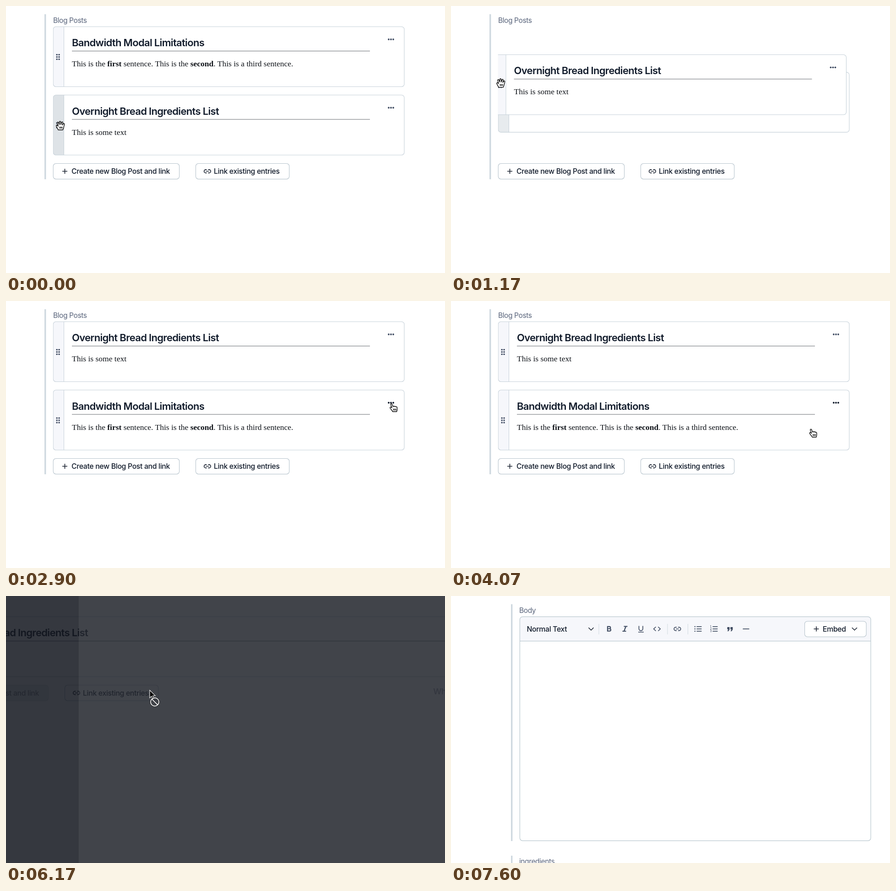
An HTML page for the animation above (9.36 s loop, 959 by 584 pixels).

```html
<!DOCTYPE html>
<html lang="en">
<head>
<meta charset="utf-8">
<title>Blog posts</title>
<style>
  html, body { margin: 0; width: 100%; height: 100%; overflow: hidden; background: #fff; }
  svg { display: block; width: 959px; height: 584px; }
  text { font: 500 15.8px Inter, sans-serif; letter-spacing: -.021em; fill: #111b2b; }
  .label { font-weight: 400; font-size: 15.6px; letter-spacing: -.028em; fill: #5a657c; }
  .title { font-weight: 600; font-size: 22px; letter-spacing: -.031em; }
  .body { font: 17.5px "Liberation Serif", serif; letter-spacing: 0; fill: #0c1016; }
  .entry { font-weight: 600; font-size: 17.9px; letter-spacing: -.023em; fill: #253049; text-anchor: middle; }
  .icon { fill: none; stroke: #414d63; stroke-width: 1.7; }
  .heavy { stroke-width: 2.2; }
  .ink { fill: none; stroke: #18202f; stroke-width: 1.6; }
  .cursor { fill: #fff; stroke: #000; stroke-width: 1.4; stroke-linejoin: round; }
</style>
</head>
<body>
<svg id="stage" viewBox="0 0 959 584"></svg>
<script>
const LOOP = 9360, ROW = 149.5;
const stage = document.getElementById('stage');

const smooth = p => p * p * (3 - 2 * p);
const linear = p => p;

// Value at time t along [time, value] keys.
function track(t, keys, ease = smooth) {
  if (t <= keys[0][0]) return keys[0][1];
  for (let i = 1; i < keys.length; i++) {
    const [t0, a] = keys[i - 1], [t1, b] = keys[i];
    if (t < t1) return a + (b - a) * ease((t - t0) / (t1 - t0));
  }
  return keys[keys.length - 1][1];
}

const group = (x, y, content, attrs = '') =>
  `<g transform="translate(${x} ${y})" ${attrs}>${content}</g>`;
const text = (x, y, content, cls = '') => `<text x="${x}" y="${y}" class="${cls}">${content}</text>`;
const path = (d, cls) => `<path d="${d}" class="${cls}"/>`;
const rect = (x, y, w, h, fill, attrs = '') =>
  `<rect x="${x}" y="${y}" width="${w}" height="${h}" fill="${fill}" ${attrs}/>`;
const dot = (x, y, r, fill) => `<circle cx="${x}" cy="${y}" r="${r}" fill="${fill}"/>`;
const bar = (x, y, h) => rect(x, y, 3.4, h, '#cfd9e0');
const plus = (x, y) => path(`M${x - 5.5} ${y}h11M${x} ${y - 5.5}v11`, 'ink');
const chevron = (x, y) => path(`M${x - 5.5} ${y - 2.8}l5.5 5.5l5.5-5.5`, 'ink');
const link = (x, y, cls) =>
  path(`M${x - 1.5} ${y - 3.6}h-2.2a3.6 3.6 0 0 0 0 7.2h2.2M${x + 1.5} ${y - 3.6}h2.2a3.6 3.6 0 0 1 0 7.2h-2.2M${x - 3} ${y}h6`, cls);
const button = (x, y, w, fill, content, attrs = '') =>
  `<g ${attrs}>${rect(x, y + 1, w, 34, '#e9edf0', 'rx="6"')}` +
  rect(x, y, w, 34, fill, 'rx="6" stroke="#b7c4cd" stroke-width="1.1"') + content + '</g>';

const overnight = ['Overnight Bread Ingredients List', 'This is some text'];
const bandwidth = ['Bandwidth Modal Limitations',
  'This is the <tspan font-weight="700">first</tspan> sentence. This is the ' +
  '<tspan font-weight="700">second</tspan>. This is a third sentence.'];

function card([title, body], x, y, { handle = '#f6f7fb', menu = '#414d63', extra = 0 } = {}) {
  let dots = '';
  for (const row of [-5, 0, 5]) dots += dot(111.2, 111.5 + row, 1.8, '#414d63') + dot(116, 111.5 + row, 1.8, '#414d63');
  for (const col of [836, 841, 846]) dots += dot(col + extra, 73, 1.9, menu);
  const w = 766.8 + extra;
  return group(x, y,
    rect(103.2, 45.2, w, 131.3, '#fff', 'rx="6"') +
    `<path d="M126.5 45.2H109.2a6 6 0 0 0-6 6V170.5a6 6 0 0 0 6 6H126.5Z" fill="${handle}"/>` +
    rect(126, 45.2, 1, 131.3, '#c6d1d9') +
    rect(103.2, 45.2, w, 131.3, 'none', 'rx="6" stroke="#c6d1d9" stroke-width="1.1"') +
    text(144, 88, title, 'title') + rect(144, 98, 651 + extra, 1, '#666a70') +
    text(144, 132, body, 'body') + dots);
}

function pointerAt(t) {
  const ease = t < 1670 ? linear : smooth;
  return {
    x: track(t, [[30, 119], [130, 118], [830, 118], [1170, 109], [1670, 110], [1900, 110], [2070, 113], [2230, 113],
      [2900, 847], [3170, 848], [3800, 800], [4000, 800], [4900, 318]], ease),
    y: track(t, [[30, 262], [130, 261], [830, 261], [1170, 169], [1500, 113], [1900, 113], [2070, 109], [2230, 109],
      [2900, 233], [3170, 234], [3800, 290], [4000, 290], [4900, 218]], ease)
  };
}

function postList(t, pointer) {
  const removed = t >= 4100, wide = t >= 5500;
  const buttonY = removed ? 195 : 344.5;
  const hover = removed && pointer.x < 379 && pointer.y < 229;
  const busy = t >= 5400;
  const extra = wide ? 600 : 0;
  const dragX = track(t, [[830, 0], [1170, -6.5], [1500, -6], [1670, 0]], linear);
  const dragY = track(t, [[830, ROW], [1170, 61.5], [1500, 2], [1670, 0]], linear);
  const swapY = track(t, [[1030, 0], [1260, ROW]]);
  const onHandle = t < 600 || (t > 1670 && pointer.x < 127);
  const swapHandle = t > 1030 && t < 1300 ? '#e7ebee' : '#f6f7fb';
  const menu = t > 2850 && t < 4100 ? '#111b2b' : '#414d63';

  let cards = '';
  if (!removed) cards += card(bandwidth, 0, swapY, { handle: swapHandle, menu });
  cards += card(overnight, dragX, dragY, { handle: onHandle ? '#dee3e7' : '#f6f7fb', extra });

  const slide = track(t, [[5550, 0], [6080, -286]]);
  return group(slide, 0,
    bar(84, 18, buttonY + 34.5 - 18) + text(103, 37, 'Blog Posts', 'label') +
    `<g clip-path="url(#list)">${cards}</g>` +
    button(103.2, buttonY, 275.4, hover ? '#e0e5e8' : '#fff',
      plus(128.5, buttonY + 17) + text(143, buttonY + 22.5, 'Create new Blog Post and link'),
      busy ? 'opacity=".5"' : '') +
    button(414.5, buttonY, 204.3, '#fff',
      link(440, buttonY + 17, 'ink') + text(454, buttonY + 22.5, 'Link existing entries')));
}

function loader(t) {
  const shown = track(t, [[6130, 0], [6170, .06], [6270, .06], [6271, .75], [6300, .97], [6400, 1]], linear);
  if (!shown) return '';
  let dots = '';
  for (let i = 0; i < 3; i++) {
    const wave = Math.sin((t - 6300) / 900 * 2 * Math.PI + .2 - i);
    const squash = wave < 0 && wave > -.9 ? 3.3 : 4;
    dots += `<ellipse cx="${726 + 13 * i}" cy="${177 - 14 * Math.max(0, wave)}" rx="4.2" ry="${squash}" fill="#2966d0"/>`;
  }
  return group(Math.max(0, 310 - 320 * shown), 0,
    rect(-132, 0, 1200, 584, '#f7f9f8') + dots + text(738.5, 215, 'What fruit is in season?', 'entry'),
    `opacity="${shown}"`);
}

function toolbar() {
  let icons = '';
  for (const x of [322.5, 472.5, 517]) icons += rect(x, 61, 1, 23, '#cfd9e0');
  // Bulleted and numbered lists share their lines.
  for (const [x, marks] of [[539.5, '•••'], [574.5, '123']]) {
    for (let i = 0; i < 3; i++) {
      const y = 67 + 5 * i;
      icons += path(`M${x - 3} ${y}h11`, 'icon');
      icons += marks[i] === '•' ? dot(x - 6.6, y, 1.2, '#414d63')
        : `<text x="${x - 8.5}" y="${y + 2}" style="font-size:5.5px;fill:#414d63">${marks[i]}</text>`;
    }
  }
  for (const x of [603.5, 610.5]) icons += `<path d="M${x} 68h5v5l-2.2 4h-2.6l2-4h-2.2z" fill="#414d63"/>`;
  return icons +
    path('M342 66.8h4a2.3 2.3 0 0 1 0 4.7h-4zM342 71.5h4.5a2.5 2.5 0 0 1 0 5.2h-4.5z', 'icon heavy') +
    path('M377.5 66.5h8M374.5 77h8M382 66.5l-4 10.5', 'icon heavy') +
    path('M410.5 65.5v6a4.3 4.3 0 0 0 8.6 0v-6M409 79h12', 'icon') +
    path('M447.5 67.5l-4.7 4.5l4.7 4.5M452.5 67.5l4.7 4.5l-4.7 4.5', 'icon') +
    link(494.5, 72, 'icon') + path('M637.5 72h14', 'icon');
}

function editor(t) {
  return rect(0, 0, 959, 584, '#fff') + `<g opacity="${track(t, [[7330, 0], [7600, 1]])}">` +
    bar(131, 18, 518) + text(149, 37, 'Body', 'label') +
    `<path d="M150.4 98.7V51.3a6 6 0 0 1 6-6H911a6 6 0 0 1 6 6V98.7Z" fill="#f6f7fb"/>` +
    rect(150, 98, 767, 1.2, '#b9c8cf') +
    rect(150.4, 45.3, 766.6, 490, 'none', 'rx="6" stroke="#b9c8cf" stroke-width="1.2"') +
    text(165.5, 77.7, 'Normal Text') + chevron(306, 72) + toolbar() +
    button(772.6, 55.2, 134.6, '#fff', plus(798, 72) + text(812, 77.7, 'Embed') + chevron(881.5, 72)) +
    bar(131, 568, 20) + text(149, 586, 'ingredients', 'label') + '</g>';
}

const openHand = path('M-5 9C-6 6-8 4-9 1C-9.6-1-7.6-2-6.3-.5L-5 1L-7-6C-7.4-8.2-5-8.8-4.2-6.8L-2.6-2.5L-2.4-8.2' +
  'C-2.3-10.3 .4-10.3 .5-8.2L.8-2.5L2.4-7.4C3.1-9.3 5.4-8.6 5.1-6.6L4.2-1.6L6-4.2C7.2-5.8 9.2-4.8 8.5-2.8C7.5 0 7.6 4 5 9Z' +
  'M-1.5 2v4M1 2v4M3.5 2v4', 'cursor');
const pointingHand = path('M-2.5 9C-3 6-6.5 4-8 1C-8.5-1-6.3-1.8-5-.2L-4 .8L-6.6-6.6C-7-8.6-4.6-9.2-3.8-7.4L-1.6-2' +
  'C-.8-3.4 1-3.2 1.5-2C2.4-3.2 4.2-2.8 4.5-1.4C5.6-2.2 7.2-1.4 7.4 0C7.8 3 7.8 5 6.5 9Z' +
  'M-.5 2.5v4M2 2.5v4M4.5 2.5v4', 'cursor');
const ring = 'M9 0a9 9 0 1 1-18 0a9 9 0 1 1 18 0M-6.2-6.2L6.2 6.2';
const blocked =
  '<path d="M0 0V16.8L3.9 13.1L6.4 19L9 17.9L6.5 12.2H12Z" fill="#000" stroke="#fff" stroke-width="1.1"/>' +
  group(11, 25.8, `<path d="${ring}" fill="none" stroke="#000" stroke-opacity=".5" stroke-width="3.5"/>` +
    `<path d="${ring}" fill="none" stroke="#f0f0f0" stroke-width="1.9"/>`);

function cursor(t, { x, y }) {
  if (t >= 7330) return '';
  if (t >= 5400) return group(314, 206, blocked);
  return group(x, y, t < 1900 || x < 127 ? openHand : pointingHand);
}

function draw(t) {
  const pointer = pointerAt(t);
  const dim = track(t, [[5400, 0], [6100, .85]]);
  const scene = t >= 7170 ? editor(t)
    : postList(t, pointer) + rect(0, 0, 959, 584, 'rgb(18,22,30)', `opacity="${dim}"`) + loader(t);
  stage.innerHTML = '<clipPath id="list"><rect x="102.6" y="0" width="1500" height="584"/></clipPath>' +
    scene + cursor(t, pointer);
}

const start = performance.now();
function frame() {
  draw((performance.now() - start) % LOOP);
  requestAnimationFrame(frame);
}
frame();
</script>
</body>
</html>
```
